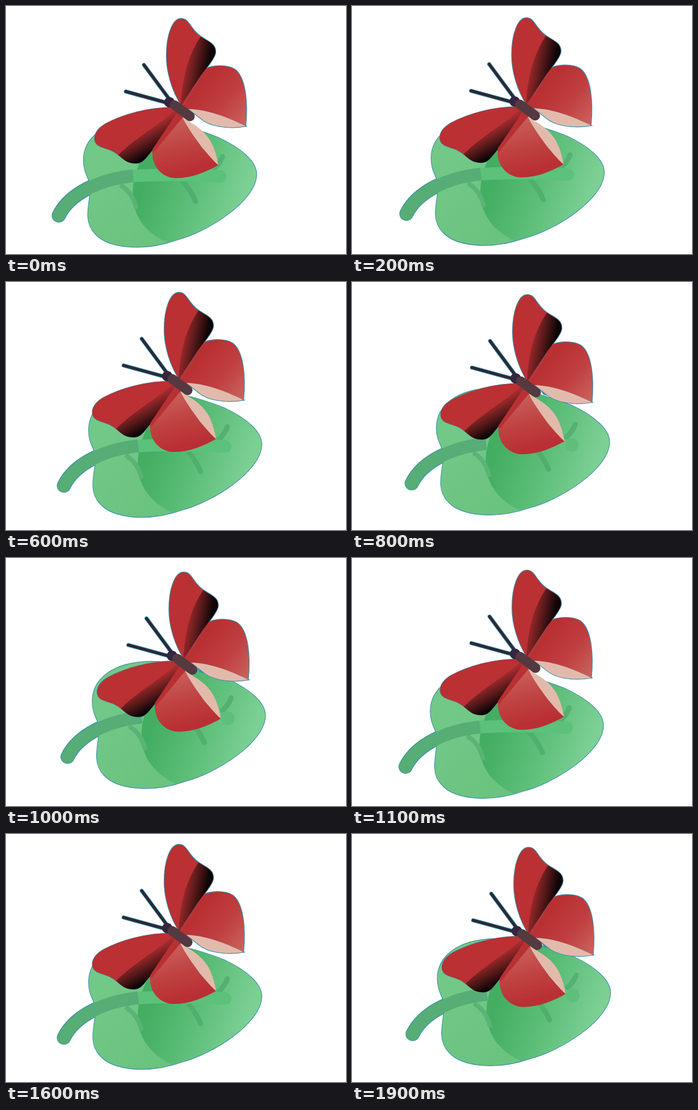
Animation, 599 px wide and 438 px high, one loop 2 s. Source, as an HTML page with a canvas:

```html
<!DOCTYPE html>
<html lang="en">
<head>
<meta charset="utf-8">
<title>Butterfly on a leaf</title>
<style>
html, body { margin: 0; width: 100%; height: 100%; overflow: hidden; background: #fff; }
canvas { display: block; }
</style>
</head>
<body>
<canvas id="stage" width="599" height="438"></canvas>
<script>
const ctx = document.getElementById('stage').getContext('2d');
const LOOP = 2000, STEP = 100;
const EDGE = '#3b90ac', RED = '#ba3033', PALE = '#e2baac', STEM = '#56ad75';
const SHADOW = ['#a82b2e', '#5c1a1b', '#0d0506'];

const leaf = new Path2D(`M150 323 C148 303 137 297 137 272 C137 235 170 203 240 202
  C280 202 330 215 375 233 C415 252 441 275 441 297 C441 345 352 400 300 413
  C240 434 180 427 158 403 C140 385 143 365 150 323Z`);
const leafHalf = new Path2D('M290 200 C220 268 186 372 284 418 L460 438 V190Z');
const stem = 'M93 370 C112 331 165 306 224 300';

// The outer edge of each forewing is shared with its dark fold.
const rightTip = 'C358 64 369 67 369 81 C369 92 350 112 340 128 Z';
const foreRight = new Path2D(`M311 178 C292 150 283 115 283 88
  C283 50 294 23 308 22.5 C323 22 323 40 343 54 ${rightTip}`);
const foreRightFold = new Path2D(`M308 176 C310 130 320 88 343 54 ${rightTip}`);

const leftTip = 'C244 278 250 262 259 254 L303 190 Z';
const foreLeft = new Path2D(`M302 179 C250 178 205 192 175 208
  C160 217 156 227 156 234 C156 248 170 249 185 255 C203 263 208 278 229 278 ${leftTip}`);
const foreLeftFold = new Path2D(`M302 181 C265 213 225 235 198 263
  C208 272 214 278 229 278 ${leftTip}`);

const hindRight = new Path2D(`M310 180 L350 112 C362 105 388 103 403 112
  C422 126 426 170 422 212 C390 196 355 183 322 182Z`);
const hindRightFold = new Path2D('M322 182 C355 183 390 196 422 212 C390 218 358 211 345 200Z');
const hindLeft = new Path2D(`M302 188 L258 254 C255 280 273 304 300 304
  C328 304 352 293 374 281 L345 250 312 197Z`);
const hindLeftRim = new Path2D('M302 188 L258 253 259 260 312 196Z');
const hindLeftFold = new Path2D('M311 197 C340 215 365 225 374 281 C355 264 325 225 311 197Z');
const gap = new Path2D('M330 189 L341 193 350 202 337 199Z');

function gradient(x0, y0, x1, y1, ...colors) {
  const g = ctx.createLinearGradient(x0, y0, x1, y1);
  colors.forEach((c, i) => g.addColorStop(i / (colors.length - 1), c));
  return g;
}

function fill(path, color) {
  ctx.fillStyle = color;
  ctx.fill(path);
}

function outline(path, width = 2.4, color = EDGE) {
  ctx.lineWidth = width;
  ctx.strokeStyle = color;
  ctx.stroke(path);
}

function line(d, width, color, cap = 'round') {
  ctx.lineCap = cap;
  outline(new Path2D(d), width, color);
}

function dot(x, y, r, color) {
  ctx.beginPath();
  ctx.arc(x, y, r, 0, 2 * Math.PI);
  ctx.fillStyle = color;
  ctx.fill();
}

function drawLeaf(p) {
  line(stem, 25, EDGE);
  outline(leaf);
  fill(leaf, gradient(150, 300, 240, 420, '#72c887', '#6bc380'));

  ctx.save();
  ctx.clip(leaf);
  fill(leafHalf, gradient(250, 295, 415, 350, '#43ae61', '#5dbe79', '#7cd094'));
  ctx.restore();

  line('M204 318 Q222 329 229 355', 8, '#5ab476');
  line('M306 304 Q324 322 334 345', 9, '#50af6f');
  line('M381 266 Q377 278 366 288', 9, '#54b073');
  if (p < 7) line('M226 300 Q300 296 377 301', 22, '#5bc17b');
  else dot(375, 302, 12, '#5fbe7b');
  dot(93, 370, 11.5, STEM);
  line(stem, 22.5, STEM, 'butt');
}

function drawButterfly(p) {
  if (p >= 8) fill(gap, EDGE);
  [foreRight, hindRight, hindRightFold].forEach(wing => outline(wing));
  outline(foreLeft, 1.4);

  fill(hindRight, gradient(345, 140, 424, 205, '#b93033', '#c03f40', '#c9635d'));
  fill(hindRightFold, PALE);
  fill(foreRight, RED);
  fill(foreRightFold, gradient(312, 105, 356, 113, ...SHADOW));

  fill(foreLeft, RED);
  fill(foreLeftFold, gradient(225, 228, 246, 267, ...SHADOW));
  fill(hindLeft, gradient(296, 210, 318, 294, '#c75a56', '#bf4140', '#b92f33'));
  fill(hindLeftRim, '#b83033');
  fill(hindLeftFold, PALE);

  const feelers = 'M288 165 L243 104 M284 171 L211 151';
  line(feelers, 7, EDGE);
  line(feelers, 5, '#2a2937');
  dot(288, 170, 9.3, '#332640');
  line('M297 175 L324 195', 17, '#543940');
}

function layer(x, y, paint, p) {
  ctx.save();
  ctx.translate(x, y);
  paint(p);
  ctx.restore();
}

function draw(time) {
  const k = Math.floor((time % LOOP) / STEP);
  const p = k > 10 ? k - 10 : k;
  // Slow drift up and left, then a quicker return past the start.
  const drift = p <= 6 ? -0.65 * p : -3.9 + 2.1 * (p - 6);

  ctx.fillStyle = '#fff';
  ctx.fillRect(0, 0, 599, 438);
  layer(1.45 * p + 0.01 * p * p, -1.5 * p - 0.04 * p * p, drawLeaf, p);
  layer(drift, drift * (drift > 0 ? 0.6 : 0.95), drawButterfly, p);
}

const start = performance.now();
function tick() {
  draw(performance.now() - start);
  requestAnimationFrame(tick);
}
tick();
</script>
</body>
</html>
```
